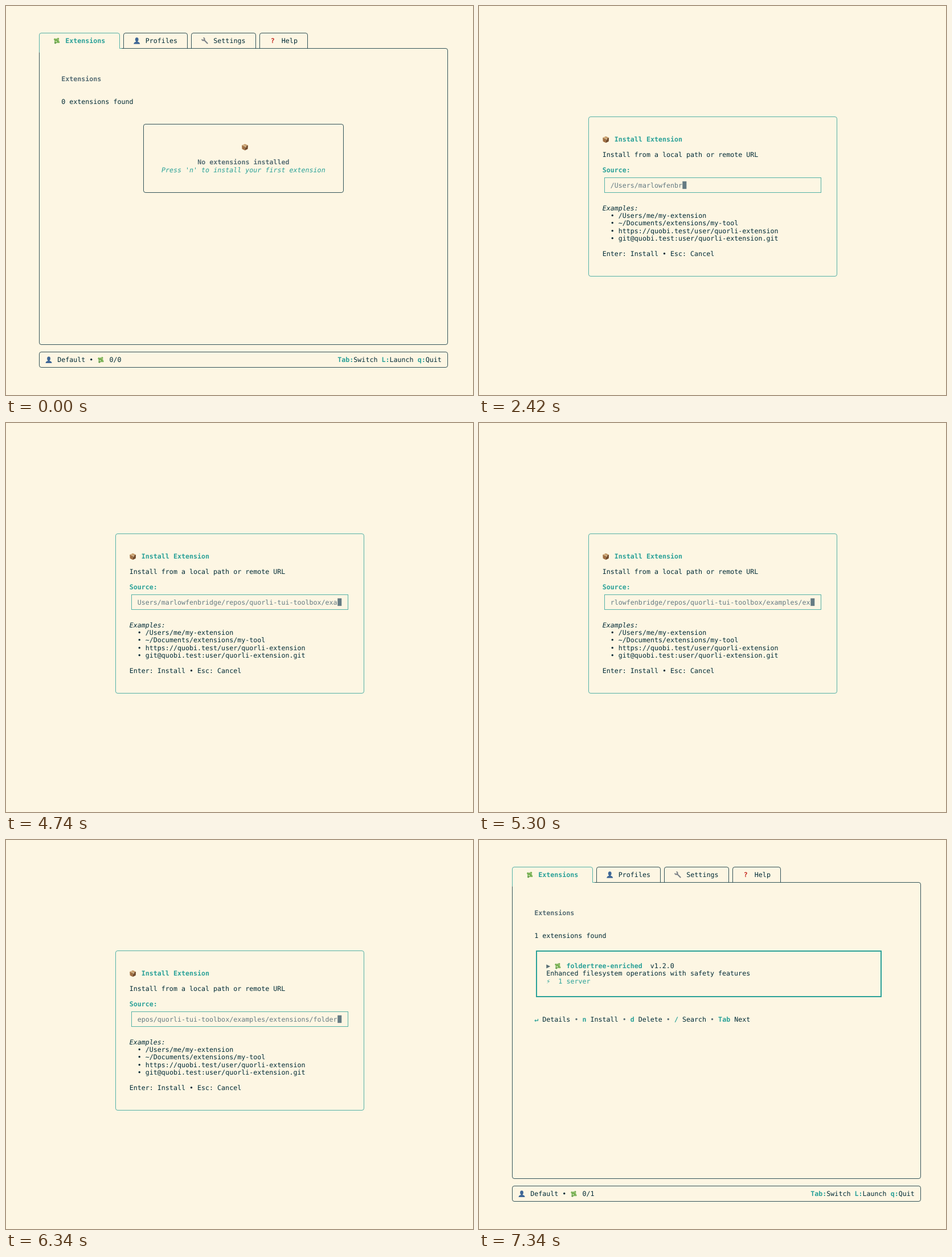
An HTML page that plays this animation: 820x683 px, repeating every 8 s.

```html
<!DOCTYPE html>
<html lang="en">
<head>
<meta charset="utf-8">
<title>Extension manager</title>
<style>
html, body { margin: 0; width: 100%; height: 100%; overflow: hidden; background: #fdf6e3; }
svg { display: block; width: 820px; height: 683px; }
text {
  font: 11.677px "DejaVu Sans Mono", monospace;
  font-variant-ligatures: none;
  text-rendering: geometricPrecision;
  white-space: pre;
  fill: #002b36;
}
.bold { font-weight: bold; }
.italic { font-style: italic; }
.teal { fill: #2aa198; }
.gray { fill: #586e75; }
.typed { fill: #657b83; }
.hint { fill: #585858; }
.paper { fill: #fdf6e3; }
.red { fill: #c5281f; font-weight: bold; }
.line { fill: none; stroke: #002b36; stroke-opacity: .8; }
.accent { stroke: #2aa198; }
.thick { stroke-width: 2; stroke-opacity: 1; transform: translate(.5px, .5px); }
</style>
</head>
<body>
<svg id="stage" viewBox="0 0 820 683">
  <defs>
    <g id="puzzle" transform="rotate(35)" fill="#78b255">
      <rect x="-3.2" y="-3.2" width="6.4" height="6.4" rx=".6"/>
      <circle cy="-4.2" r="1.7"/>
      <circle cx="4.2" r="1.7"/>
      <circle cx="-4.2" r="1.7"/>
      <circle cy="4.4" r="1.7" fill="#5f9a45"/>
      <circle cy="1.8" r="1" fill="#fdf6e3"/>
      <path fill="none" stroke="#b9c98a" stroke-width=".7" d="M-2.6-2.6H2.6"/>
    </g>
    <g id="person" fill="#3f6796">
      <ellipse cy="-2.3" rx="2.9" ry="3.5"/>
      <path d="M-5.5 5.8C-5.3 3-3.6 2.4-1.5 1.7V0h3v1.7C3.6 2.4 5.3 3 5.5 5.8z"/>
    </g>
    <g id="wrench" fill="none" stroke="#7d8288">
      <path stroke-width="2.1" stroke-linecap="round" d="M-1.8-1.8 4.4 4.4"/>
      <path stroke-width="1.9" d="M-2.8-5.2A2.3 2.3 0 1 1-5.2-2.8"/>
    </g>
    <g id="box">
      <path fill="#c59a68" d="M-5.4-3.2 0-5.6 5.4-3.2 0-.6z"/>
      <path fill="#a06f41" d="M-5.4-3.2 0-.6V5.8L-5 3.2z"/>
      <path fill="#6f4829" d="M0-.6 5.4-3.2 5 3.2 0 5.8z"/>
      <path fill="#e0c9a0" d="M-3.2-4.2 2.2-1.7V.6L.9 1.2V-1.1L-4.4-3.7z"/>
    </g>
  </defs>
  <g id="main"></g>
  <g id="dialog"></g>
</svg>
<script>
const LOOP = 8000, OPEN = 500, BLINK_OFF = 860, BLINK_ON = 1180, CLOSE = 7300;
const CELL = 7.03, ROW = 13.34, R = 3.5, FIELD = 50;
const PATH = "/Users/marlowfenbridge/repos/quorli-tui-toolbox/examples/extensions/foldertree-enriched";
const HINT = "/path/to/extension or https://quobi.test/user/repo.git".slice(0, FIELD + 1);

const $ = id => document.getElementById(id);
// Left edge and middle height of a terminal cell
const left = c => 55 + CELL * c;
const mid = r => 47.7 + ROW * r;
// Box lines run through cell centres, on whole pixels
const X = c => Math.floor(left(c) + 3.7) + 0.5;
const Y = r => Math.floor(mid(r)) + 0.5;

// Runs alternate between text and class names
function text(col, row, ...runs) {
  let spans = "";
  for (let i = 0; i < runs.length; i += 2)
    spans += `<tspan class="${runs[i + 1] || ""}">${runs[i]}</tspan>`;
  return `<text x="${left(col)}" y="${mid(row) + 4}">${spans}</text>`;
}
const icon = (name, col, row) =>
  `<use href="#${name}" x="${left(col) + 6}" y="${mid(row)}"/>`;
const path = (d, cls = "") => `<path class="line ${cls}" d="${d}"/>`;
const frame = (c1, r1, c2, r2, cls = "", rx = R) =>
  `<rect class="line ${cls}" x="${X(c1)}" y="${Y(r1)}" width="${X(c2) - X(c1)}" height="${Y(r2) - Y(r1)}" rx="${rx}"/>`;
const tab = (c1, c2, foot = Y(2), cls = "", tail = "") =>
  path(`M${X(c1)} ${foot}V${Y(0) + R}q0 ${-R} ${R} ${-R}H${X(c2) - R}q${R} 0 ${R} ${R}V${Y(2)}${tail}`, cls);

function shell(count) {
  const key = "teal bold", side = Y(2.5);
  return tab(0, 20, side, "accent", `h${R}`) + tab(21, 37) + tab(38, 54) + tab(55, 67) +
    path(`M${X(20) + R} ${Y(2)}H${X(102) - R}q${R} 0 ${R} ${R}V${Y(41) - R}q0 ${R} ${-R} ${R}H${X(0) + R}q${-R} 0 ${-R} ${-R}V${side}`) +
    icon("puzzle", 4, 1) + text(7, 1, "Extensions", key) +
    icon("person", 24, 1) + text(27, 1, "Profiles") +
    icon("wrench", 41, 1) + text(44, 1, "Settings") +
    text(58.3, 1, "?", "red") + text(61, 1, "Help") +
    text(6, 6, "Extensions", "gray bold") +
    text(6, 9, `${count} extensions found`) +
    frame(0, 42, 102, 44) +
    icon("person", 2, 43) + text(5, 43, "Default •") +
    icon("puzzle", 15, 43) + text(18, 43, `0/${count}`) +
    text(75, 43, "Tab:", key, "Switch ", "", "L:", key, "Launch ", "", "q:", key, "Quit");
}

const emptyView = () => shell(0) +
  frame(26, 12, 76, 21) + icon("box", 51, 15) +
  text(40, 17, "No extensions installed", "gray bold") +
  text(31, 18, "Press 'n' to install your first extension", "teal italic");

function listView() {
  const key = "teal bold", dot = [" • ", "gray"];
  return shell(1) + frame(6, 11, 92, 17, "accent thick", 0) +
    text(9, 13, "▶", "gray") + icon("puzzle", 11, 13) +
    text(14, 13, "foldertree-enriched", key, "  v1.2.0") +
    text(9, 14, "Enhanced filesystem operations with safety features") +
    text(9, 15, "⚡", "teal") + text(12, 15, "1 server", "teal") +
    text(6, 20, "↵", key, " Details", "", ...dot, "n", key, " Install", "", ...dot,
      "d", key, " Delete", "", ...dot, "/", key, " Search", "", ...dot, "Tab", key, " Next");
}

function dialogView() {
  const examples = [
    "/Users/me/my-extension",
    "~/Documents/extensions/my-tool",
    "https://quobi.test/user/quorli-extension",
    "git@quobi.test:user/quorli-extension.git"
  ];
  return frame(19, 11, 81, 32, "accent") +
    icon("box", 23, 14) + text(26, 14, "Install Extension", "teal bold") +
    text(23, 16, "Install from a local path or remote URL") +
    text(23, 18, "Source:", "teal bold") +
    frame(23, 19, 77, 21, "accent", 0) + `<g id="field"></g>` +
    text(23, 23, "Examples:", "italic") +
    examples.map((line, i) => text(25, 24 + i, "• " + line)).join("") +
    text(23, 29, "Enter: Install • Esc: Cancel");
}

const cursor = col =>
  `<rect class="typed" x="${left(col)}" y="${mid(20) - ROW / 2}" width="${CELL}" height="${ROW}"/>`;

// Keys land every 70 ms, shown on a 40 ms refresh
const keyTime = n => 1140 + 40 * Math.ceil((70.05 * n - 4) / 40);

function fieldView(t) {
  let n = 0;
  while (n < PATH.length && keyTime(n + 1) <= t) n++;
  if (n) {
    const shown = PATH.slice(0, n).slice(-FIELD);
    return text(25, 20, shown, "typed") + cursor(25 + shown.length);
  }
  const lit = t < BLINK_OFF || t >= BLINK_ON;
  return (lit ? cursor(25) : "") +
    text(25, 20, HINT[0], lit ? "paper" : "hint", HINT.slice(1), "hint");
}

const cache = new Map();
function show(el, html) {
  if (cache.get(el) === html) return;
  cache.set(el, html);
  el.innerHTML = html;
}

const main = $("main"), dialog = $("dialog");
dialog.innerHTML = dialogView();
const field = $("field"), empty = emptyView(), list = listView();

function draw() {
  const t = performance.now() % LOOP;
  const open = t >= OPEN && t < CLOSE;
  main.style.display = open ? "none" : "";
  dialog.style.display = open ? "" : "none";
  if (open) show(field, fieldView(t));
  else show(main, t < OPEN ? empty : list);
  requestAnimationFrame(draw);
}
draw();
</script>
</body>
</html>
```
